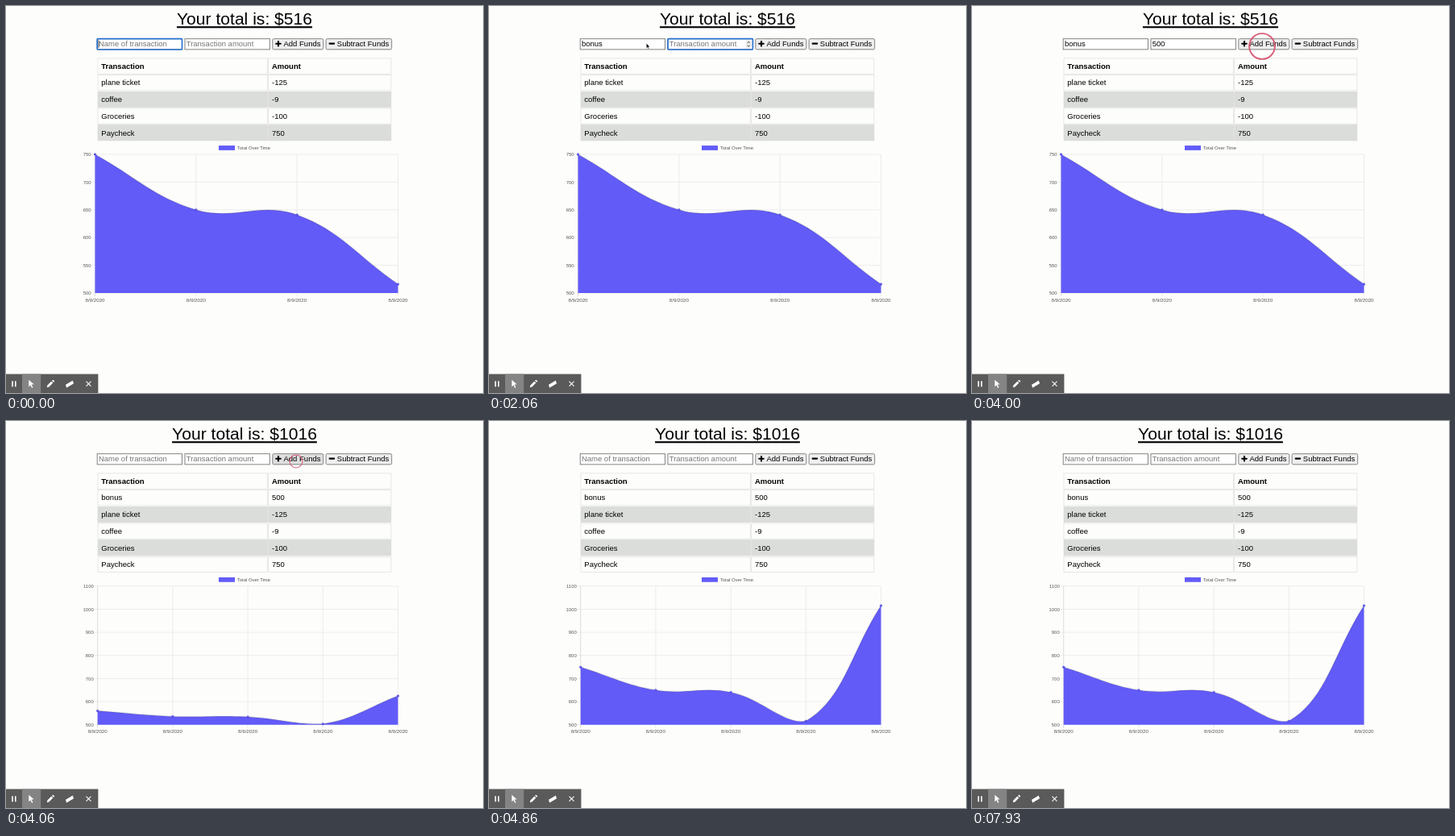
Write an HTML page that moves like this. It is 592 px wide and 480 px high and loops after 8 s.

```html
<!DOCTYPE html>
<html lang="en">
<head>
<meta charset="utf-8">
<title>Budget tracker</title>
<style>
html, body { margin: 0; width: 100%; height: 100%; overflow: hidden; background: #fdfdfc; }
svg { display: block; width: 592px; height: 480px; }
text { font: 9.5px "Liberation Sans", Arial, sans-serif; fill: #000; white-space: pre; }
.title { font-size: 21.1px; text-anchor: middle; text-decoration: underline; text-decoration-skip-ink: none; }
.head { font-weight: bold; }
.tick { font-size: 5.9px; fill: #555; }
.date { font-size: 6.2px; fill: #555; text-anchor: middle; }
.end { text-anchor: end; }
.empty { fill: #757575; }
</style>
</head>
<body>
<svg id="stage" viewBox="0 0 592 480"></svg>
<script>
const LOOP = 8000;
const SUBMIT = 4060;      // new row and chart appear
const CHART_START = 3994; // chart easing begins
const PURPLE = '#625bf8';
const stage = document.getElementById('stage');

function add(parent, tag, attrs = {}, text) {
  const node = document.createElementNS('http://www.w3.org/2000/svg', tag);
  for (const key in attrs) node.setAttribute(key, attrs[key]);
  if (text !== undefined) node.textContent = text;
  return parent.appendChild(node);
}
const label = (parent, x, y, text, cls = '') => add(parent, 'text', { x, y, class: cls }, text);
const rect = (parent, x, y, width, height, attrs) => add(parent, 'rect', { x, y, width, height, ...attrs });
const path = (parent, d, attrs) => add(parent, 'path', { d, fill: 'none', ...attrs });
const show = (node, on) => node.setAttribute('visibility', on ? 'visible' : 'hidden');

// Table
const ROWS = [['bonus', 500], ['plane ticket', -125], ['coffee', -9], ['Groceries', -100], ['Paycheck', 750]];

function drawTable(parent, rows) {
  [['Transaction', 'Amount'], ...rows].forEach((cells, i) => {
    const y = 64.9 + i * 20.68;
    const shaded = i > 0 && i % 2 === 0;
    [[114, 210.6], [325.7, 152.2]].forEach(([x, width], col) => {
      rect(parent, x, y, width, 19.3, {
        fill: shaded ? '#dbdddb' : '#fdfdfc', stroke: shaded ? '#d8dad8' : '#dedede', 'stroke-width': .7
      });
      label(parent, x + 4.3, y + 12.9, cells[col], i ? '' : 'head');
    });
  });
}

// Chart
function splinePath(pts, top, base) {
  const clampY = y => Math.min(base, Math.max(top, y));
  const handles = pts.map((p, i) => {
    const a = pts[i - 1] || p, b = pts[i + 1] || p;
    const before = Math.hypot(p.x - a.x, p.y - a.y);
    const after = Math.hypot(b.x - p.x, b.y - p.y);
    const k = .4 / (before + after);
    const at = s => `${p.x + s * (b.x - a.x)},${clampY(p.y + s * (b.y - a.y))}`;
    return { into: at(-k * before), out: at(k * after) };
  });
  return pts.map((p, i) => i
    ? `C${handles[i - 1].out} ${handles[i].into} ${p.x},${p.y}`
    : `M${p.x},${p.y}`).join('');
}

function makeChart(parent, { left, top, max, step, values }) {
  const right = 486.5, height = 172, base = top + height;
  const gap = (right - left) / (values.length - 1);
  const line = (d, dark) => path(parent, d, { stroke: dark ? '#cfcfcf' : '#e5e5e5', 'stroke-width': .7 });

  rect(parent, 264, top - 10.9, 20, 5.8, { fill: PURPLE });
  label(parent, 286.8, top - 5.9, 'Total Over Time', 'tick');
  for (let v = 500; v <= max; v += step) {
    const y = base - (v - 500) / (max - 500) * height;
    line(`M${left - 4} ${y}H${right}`);
    label(parent, left - 5, y + 2.1, v, 'tick end');
  }
  values.forEach((v, i) => {
    const x = left + i * gap;
    line(`M${x} ${top}V${base + 4}`, i === 0);
    label(parent, x, base + 10.5, '8/9/2020', 'date');
  });

  const area = path(parent, '', { fill: PURPLE });
  const curve = path(parent, '', { stroke: 'rgba(0,0,0,.13)', 'stroke-width': 1.4 });
  const dots = values.map(() => add(parent, 'circle', { r: 1.5, fill: PURPLE, stroke: 'rgba(0,0,0,.2)', 'stroke-width': .5 }));
  const full = values.map((v, i) => ({ x: left + i * gap, y: base - (v - 500) / (max - 500) * height }));
  const settled = splinePath(full, top, base);

  return progress => {
    const pts = full.map(p => ({ x: p.x, y: base - (base - p.y) * progress }));
    const d = progress === 1 ? settled : splinePath(pts, base - height * progress, base);
    curve.setAttribute('d', d);
    area.setAttribute('d', `${d}V${base}H${left}Z`);
    dots.forEach((dot, i) => {
      dot.setAttribute('cx', pts[i].x);
      dot.setAttribute('cy', pts[i].y);
    });
  };
}

// Two states of the page
const before = add(stage, 'g'), after = add(stage, 'g');
label(before, 296, 23.2, 'Your total is: $516', 'title');
label(after, 296, 23.2, 'Your total is: $1016', 'title');
drawTable(before, ROWS.slice(1));
drawTable(after, ROWS);
makeChart(before, { left: 110.5, top: 184, max: 750, step: 50, values: [750, 650, 641, 516] })(1);
const growChart = makeChart(after, { left: 113.7, top: 204.8, max: 1100, step: 100, values: [750, 650, 641, 516, 1016] });

// Form
function makeField(x, width, hint) {
  rect(stage, x, 40.7, width, 13.2, { fill: '#fff', stroke: '#767676', 'stroke-width': .9 });
  const focus = rect(stage, x, 40.6, width, 13.4, { rx: 1.2, fill: 'none', stroke: '#2a73d2', 'stroke-width': 1.7 });
  const text = label(stage, x + 1.7, 50.4, hint);
  const caret = path(stage, '', { stroke: '#000', 'stroke-width': .7 });
  return (value, focused, blink) => {
    const shown = value || hint;
    if (text.textContent !== shown) text.textContent = shown;
    text.setAttribute('class', value ? '' : 'empty');
    show(focus, focused);
    show(caret, focused && blink);
    const end = x + 1.8 + (value ? text.getComputedTextLength() : 0);
    caret.setAttribute('d', `M${end} 42.3v9.6`);
  };
}
const setName = makeField(113.2, 105.3, 'Name of transaction');
const setAmount = makeField(222, 105.4, 'Transaction amount');

const spinner = add(stage, 'g');
rect(spinner, 319, 42, 6.4, 10.6, { rx: 1.5, fill: '#e9e9e9' });
path(spinner, 'M320.8 45.9l1.4-1.7 1.4 1.7M320.8 48.7l1.4 1.7 1.4-1.7', { stroke: '#444', 'stroke-width': .9 });

function makeButton(x, width, text, icon) {
  const box = rect(stage, x, 40.7, width, 13.2, { rx: 1.6, fill: '#efefef', stroke: '#767676', 'stroke-width': .9 });
  path(stage, icon, { stroke: '#000', 'stroke-width': 2.1, 'stroke-linecap': 'round' });
  label(stage, x + 13.7, 50.4, text);
  return box;
}
const addButton = makeButton(330.8, 63, 'Add Funds', 'M335.2 46.8h5.6M338 44v5.6');
makeButton(397.1, 81.6, 'Subtract Funds', 'M401.6 46.6h5.6');

// Recorder bar
const bar = add(stage, 'g');
rect(bar, 0, 456.5, 114.4, 23.5, { fill: '#595a59' });
rect(bar, 20, 456.5, 23.2, 23.5, { fill: '#838483' });
path(bar, 'M8 465.2v7M11.8 465.2v7', { stroke: '#fff', 'stroke-width': 1.6 });
path(bar, 'M28.3 463.8l6.3 5.5-3 .3 1.8 3.4-1.3.7-1.7-3.5-2.1 2z', { fill: '#fff' });
path(bar, 'M50.8 473l.5-2.5 5-5 2 2-5 5zM57 464.8l.9-.9q.5-.4 1 .1l1 1q.5.5 0 1l-.9.8z', { fill: '#fff' });
path(bar, 'M74 469.7l8.8-5.3 1.2 3.8-8.8 5.3z', { fill: '#fff' });
path(bar, 'M99.5 465.7l6 6M105.5 465.7l-6 6', { stroke: '#fff', 'stroke-width': 1.1 });

// Pointer and click ring
const pointer = path(stage, 'M0 0v6.3l1.4-1.3 1 2.3 1-.4-1-2.3h2z', { fill: '#000', stroke: '#fff', 'stroke-width': .5 });
const ring = add(stage, 'circle', { cx: 360, cy: 50, fill: 'none', stroke: '#d95f79' });

// Timed steps: [ms, value]
const NAME_KEYS = [[330, 'b'], [460, 'bo'], [600, 'bon'], [730, 'bonu'], [930, 'bonus'], [SUBMIT, '']];
const AMOUNT_KEYS = [[2530, '5'], [2730, '50'], [2860, '500'], [SUBMIT, '']];
const FOCUS = [[0, 'name'], [1500, 'amount'], [3860, '']];
const POINTER_X = [[1700, 186], [1990, 195.3], [2200, 195.3]];
const POINTER_Y = [[1700, 50], [1990, 46.2], [2200, 46.2]];
const RING = [[3860, 6], [3960, 16], [4000, 16], [4060, 8], [4130, 6]];

const current = (steps, t) => steps.reduce((last, s) => s[0] <= t ? s : last, [0, '']);
const within = (steps, t) => t >= steps[0][0] && t < steps[steps.length - 1][0];
function tween(steps, t) {
  const i = steps.findIndex(s => s[0] > t);
  if (i <= 0) return steps[i ? steps.length - 1 : 0][1];
  const [t0, a] = steps[i - 1], [t1, b] = steps[i];
  return a + (b - a) * (t - t0) / (t1 - t0);
}

function draw(t) {
  const submitted = t >= SUBMIT;
  show(before, !submitted);
  show(after, submitted);
  const p = Math.min(1, Math.max(0, (t - CHART_START) / 1000));
  growChart(1 - (1 - p) ** 4);

  const [focusTime, focus] = current(FOCUS, t);
  const [nameTime, name] = current(NAME_KEYS, t);
  const [amountTime, amount] = current(AMOUNT_KEYS, t);
  const blink = since => Math.floor((t - Math.max(since, focusTime)) / 500) % 2 === 0;
  setName(name, focus === 'name', blink(nameTime));
  setAmount(amount, focus === 'amount', blink(amountTime));
  show(spinner, focus === 'amount');

  show(pointer, within(POINTER_X, t));
  pointer.setAttribute('transform', `translate(${tween(POINTER_X, t)} ${tween(POINTER_Y, t)})`);

  const r = tween(RING, t);
  show(ring, within(RING, t));
  ring.setAttribute('r', r);
  ring.setAttribute('stroke-width', .2 + r / 9);
  addButton.setAttribute('fill', submitted && t < 4200 ? '#dfdfdf' : '#efefef');
}

const start = performance.now();
function tick() {
  draw((performance.now() - start) % LOOP);
  requestAnimationFrame(tick);
}
tick();
</script>
</body>
</html>
```
